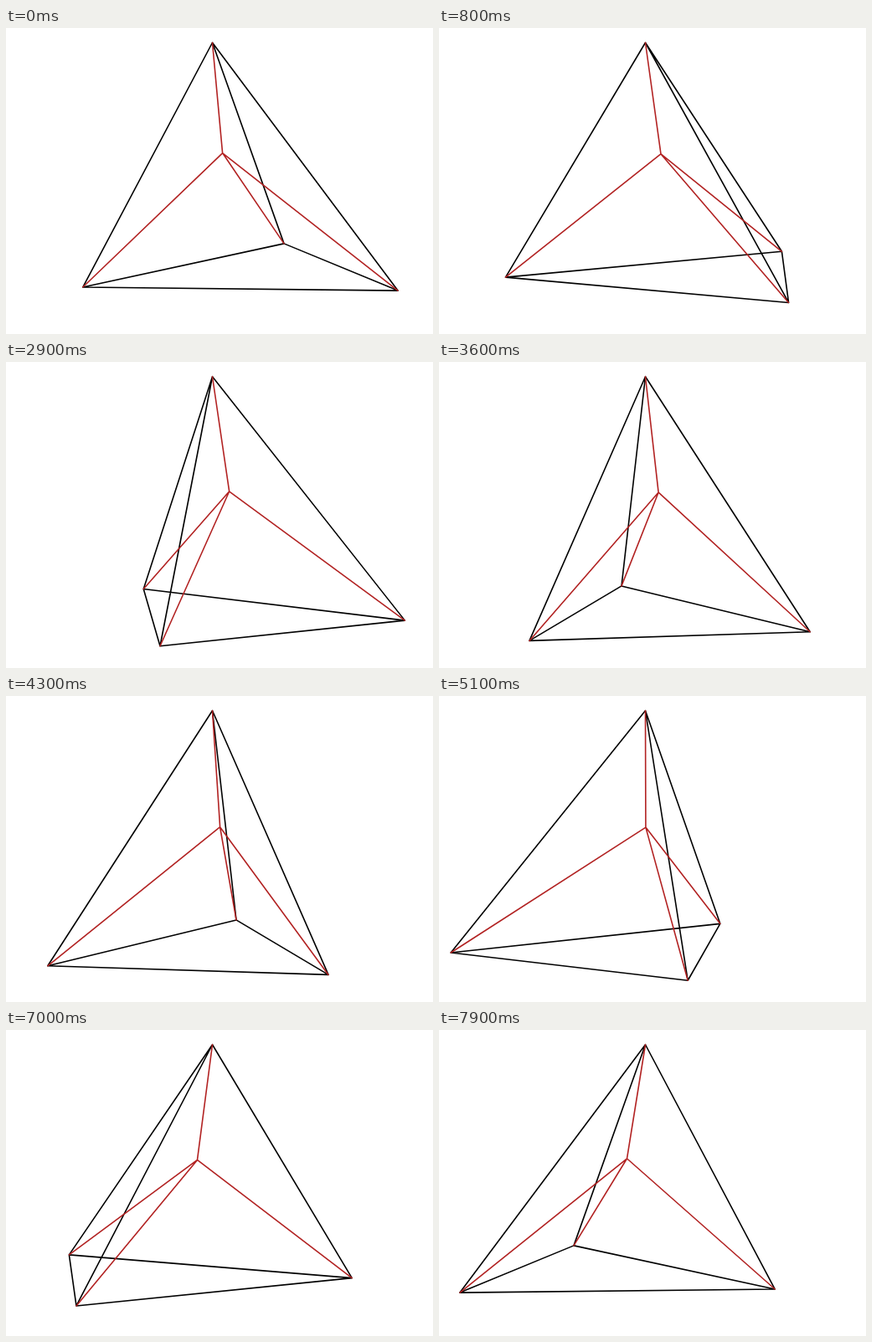
Recreate the animation shown at these times as an HTML page with a canvas. Size 510x366 px, loop 8000 ms.

```html
<!DOCTYPE html>
<html lang="en">
<head>
<meta charset="utf-8">
<title>Turning tetrahedron</title>
<style>
  html, body { margin: 0; width: 100%; height: 100%; overflow: hidden; background: #fff; }
  canvas { display: block; }
</style>
</head>
<body>
<canvas id="stage" width="510" height="366"></canvas>
<script>
const ctx = document.getElementById("stage").getContext("2d");
const LOOP = 8000, STEP = 100, TURN = 0.05;
const START = -1.975;   // first angle, measured from the far side
const AXIS = 246.5, TILT = 0.183, DEPTH = 8300;
const HALF = 167;
const rad = deg => deg * Math.PI / 180;

// A point circling the vertical axis, seen slightly from above.
function orbit(radius, angle, height) {
  const away = radius * Math.cos(angle);
  const scale = 1 - away / DEPTH;
  return [AXIS + radius * Math.sin(angle) * scale, height - away * TILT];
}

function edges(color, pairs) {
  ctx.strokeStyle = color;
  ctx.beginPath();
  for (const [p, q] of pairs) {
    ctx.moveTo(...p);
    ctx.lineTo(...q);
  }
  ctx.stroke();
}

function draw(time) {
  const turn = START + Math.floor(time / STEP) * TURN;
  const apex = [AXIS, 17.5];
  const a = orbit(HALF, turn, 298);
  const b = orbit(HALF * Math.SQRT2, turn + rad(135), 298);
  const c = orbit(HALF * Math.SQRT2, turn - rad(135), 298);
  const core = orbit(22.4, turn + rad(146), 153);

  ctx.fillStyle = "#fff";
  ctx.fillRect(0, 0, 510, 366);
  ctx.lineWidth = 1.6;
  ctx.lineCap = "round";
  edges("#000", [[apex, a], [apex, b], [apex, c], [a, b], [b, c], [c, a]]);
  edges("#b22222", [apex, a, b, c].map(p => [core, p]));
}

const begin = performance.now();
function tick(now) {
  draw(Math.max(0, now - begin) % LOOP);
  requestAnimationFrame(tick);
}
draw(0);
requestAnimationFrame(tick);
</script>
</body>
</html>
```
